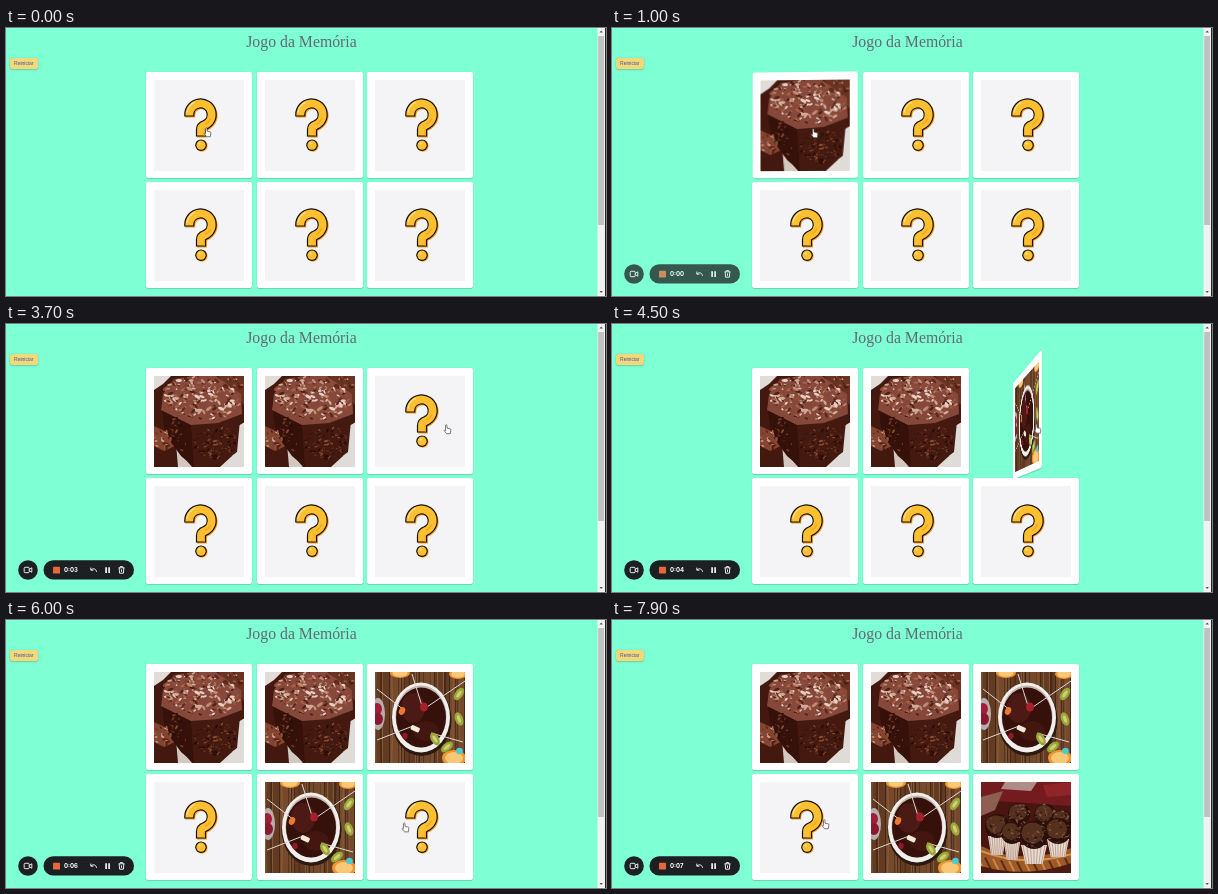
An HTML page for the animation above (8000 ms loop, 600x268 px).

```html
<!DOCTYPE html>
<html lang="pt">
<head>
<meta charset="utf-8">
<title>Jogo da Memória</title>
<style>
html, body { margin: 0; width: 600px; height: 268px; overflow: hidden; background: #7fffd4; }
body { position: relative; }
h1, .restart, .board, .card, .face, .bar, .rec, .cursor { position: absolute; }
h1 {
  margin: 0; left: 0; top: 3.6px; width: 591px; text-align: center;
  font: 15.8px/19px "Liberation Serif", "Times New Roman", serif; color: #5f6a72;
}
.restart {
  left: 4px; top: 30px; width: 27.5px; height: 11px; border-radius: 2px; text-align: center;
  font: 5px/11.5px "Liberation Sans", Arial, sans-serif; color: #4c4fa8;
  background: #f0d979; box-shadow: 0 .5px 1.5px rgba(60, 90, 70, .5);
}
.board { inset: 0; perspective: 520px; perspective-origin: 304px 207px; }
.card { width: 106px; height: 106px; transform-style: preserve-3d; }
.face {
  inset: 0; background: #fff; border-radius: 2px; backface-visibility: hidden;
  box-shadow: 0 .6px 1px rgba(0, 0, 0, .32);
}
.front { transform: rotateY(180deg); }
.face svg { position: absolute; left: 7.75px; top: 8px; width: 90.5px; height: 90.5px; overflow: hidden; }
.bar { left: 0; top: 0; }
.rec { left: 0; top: 226px; }
.rec text { font: 700 6px Inter, sans-serif; fill: #fff; }
.cursor { left: 0; top: 0; width: 10px; height: 13px; }
.cursor svg { position: absolute; left: 0; top: 0; overflow: visible; }
</style>
</head>
<body>
<h1>Jogo da Memória</h1>
<div class="restart">Reiniciar</div>
<div class="board"></div>

<svg class="bar" width="600" height="268">
  <path d="M591.5 0h7.5v268h-7.5z" fill="#f1f1f1"/>
  <path d="M592.2 8h5.8v189h-5.8z" fill="#c1c1c1"/>
  <path d="M593.5 4.5l1.7-2 1.7 2zM593.5 263l1.7 2 1.7-2z" fill="#555"/>
  <path d="M599 0h1v268h-1z" fill="#222"/>
</svg>

<svg class="rec" width="140" height="40">
  <g fill="#1d2022">
    <circle cx="22" cy="20" r="9.8"/>
    <rect x="37.5" y="10.2" width="90.5" height="19.4" rx="9.7"/>
  </g>
  <rect x="47" y="16.7" width="7" height="6.8" rx=".6" fill="#e5673a"/>
  <text x="58" y="22.2">0:00</text>
  <g fill="none" stroke="#fff" stroke-width=".9" stroke-linejoin="round">
    <rect x="18.2" y="17.3" width="5" height="5.4" rx="1"/>
    <path d="M23.2 19.4l2.6-1.6v4.4l-2.6-1.6"/>
    <path d="M84.8 17.6v2.6h2.6M85 20c1.8-2 4.8-1.6 5.6 1.8"/>
    <path d="M112.5 17.8h6M114.3 17.6v-1h2.4v1M113.2 18l.4 5.2h3.8l.4-5.2M115.5 19.4v2.4"/>
  </g>
  <path d="M99.3 17.3h1.6v5.6h-1.6zM102.3 17.3h1.6v5.6h-1.6z" fill="#fff"/>
</svg>

<div class="cursor">
  <svg class="hand" width="8" height="11">
    <path d="M1.5 5.6V1.2q.8-1 1.5 0v2.9l3.1.7q.9.3.8 1.3l-.6 3.6H2.6L.2 6.6q.2-1.2 1.3-.1z" fill="#fff" stroke="#444" stroke-width=".7" stroke-linejoin="round"/>
  </svg>
  <svg class="arrow" width="8" height="11">
    <path d="M0 0v7.2l1.6-1.5 1.1 2.5 1.1-.5-1.1-2.4h2.2z" fill="#fff" stroke="#222" stroke-width=".7"/>
  </svg>
</div>

<script>
const LOOP = 8000, FLIP = 500;
const $ = s => document.querySelector(s);

function random(seed) {
  return () => (seed = (seed * 16807) % 2147483647) / 2147483647;
}
const poly = (points, fill) => `<polygon points="${points}" fill="${fill}"/>`;
const oval = (x, y, rx, ry, fill, extra = '') =>
  `<ellipse cx="${x}" cy="${y}" rx="${rx}" ry="${ry}" fill="${fill}" ${extra}/>`;
const line = (d, stroke, width) =>
  `<path d="${d}" fill="none" stroke="${stroke}" stroke-width="${width}"/>`;
const picture = body => `<svg viewBox="0 0 90.5 90.5">${body}</svg>`;

// Flakes scattered inside a tilted ellipse
function flakes(rnd, n, [x, y, rx, ry, tilt], colors, size) {
  let out = '';
  for (let i = 0; i < n; i++) {
    const a = rnd() * 6.283, r = Math.sqrt(rnd());
    const px = r * rx * Math.cos(a), py = r * ry * Math.sin(a);
    const w = size * (.5 + rnd());
    out += oval(px, py, w, w * .45, colors[Math.floor(rnd() * colors.length)],
      `transform="rotate(${(rnd() * 120 - 60).toFixed()} ${px} ${py})"`);
  }
  return `<g transform="translate(${x} ${y}) rotate(${tilt})">${out}</g>`;
}

function question() {
  const hook = (a, b) => `M35.3 ${a}V34.6A11.2 11.2 0 1 1 50.8 45Q47 46.4 47 49.5V${b}`;
  return picture(`
    <rect width="91" height="91" fill="#f4f3f5"/>
    <g transform="translate(.9 .8)">${line(hook(36.6, 56.6), '#f59a23', 10)}${oval(47, 65.2, 5.7, 5.7, '#f59a23')}</g>
    ${line(hook(36.6, 56.6), '#15120f', 10.2)}
    ${line(hook(35.5, 55.5), '#fcbf2f', 7.8)}
    ${line('M50.3 49.6V55.4M56.9 38.5Q54.8 42.8 51 44.6', '#f5a623', 1.4)}
    ${line('M33 32.5Q34.5 25 40.5 22.2', '#ffe39a', 1.1)}
    ${oval(47, 65.2, 5.8, 5.8, '#15120f')}${oval(47, 65.2, 4.6, 4.6, '#fcbf2f')}
    ${oval(45.6, 63.6, 1.2, 1, '#ffe39a')}`);
}

function brownie() {
  const rnd = random(77);
  const crust = ['#c08a74', '#a7614a', '#e6d0c6', '#4e1f14', '#8f4e39', '#5f2a1c', '#d3aa98'];
  const crumb = ['#260c07', '#753c28', '#5c2819', '#31110a', '#8a5038'];
  return picture(`
    <rect width="91" height="91" fill="#43190f"/>
    ${poly('0,0 17,0 9,8 0,14', '#e2dcd8')}
    ${poly('91,46 91,91 66,91 78,80 84,50', '#dfdbd6')}
    ${poly('22,72 38,91 20,91', '#d3c8c0')}
    ${poly('64,0 91,0 91,30', '#6a3324')}
    ${poly('0,46 14,53 22,68 24,91 0,91', '#43180f')}
    ${poly('0,50 13,56 21,70 10,75 0,70', '#834430')}
    ${poly('7,27 37,46 40,91 27,80 11,58', '#35110a')}
    ${poly('37,46 87,34 83,76 68,87 40,91', '#441a10')}
    ${poly('20,3 58,-3 87,18 88,38 64,47 37,49 7,34 9,18', '#86483a')}
    ${flakes(rnd, 190, [48, 22, 38, 21, 9], crust, 2.3)}
    ${flakes(rnd, 90, [61, 66, 21, 17, -12], crumb, 1.6)}
    ${flakes(rnd, 24, [23, 58, 7, 19, -18], crumb, 1.6)}
    ${flakes(rnd, 26, [9, 64, 9, 9, 30], crust, 1.8)}
    ${flakes(rnd, 20, [80, 9, 9, 8, 30], crust, 1.8)}`);
}

function fondue() {
  const rnd = random(31);
  let planks = '';
  for (let x = 0; x < 91; x += 15) {
    planks += `<rect x="${x}" width="14.2" height="91" fill="${x % 2 ? '#74492c' : '#623b22'}"/>`;
    for (let k = 0; k < 4; k++) {
      const gx = x + 1 + rnd() * 12;
      planks += line(`M${gx} 0q${rnd() * 4 - 2} 45 0 91`, k % 2 ? '#3f2413' : '#946541', .8);
    }
  }
  const slice = (x, y, rx, ry) => oval(x, y, rx, ry, '#ef9531') + oval(x, y, rx * .75, ry * .75, '#f8c877');
  const kiwi = (x, y, a) => oval(x, y, 4, 7, '#98a83a', `transform="rotate(${a} ${x} ${y})"`) +
    oval(x, y, 1.6, 4, '#d2cf72', `transform="rotate(${a} ${x} ${y})"`);
  const sticks = ['M2 17L29 38', 'M2 68L38 54', 'M90 9L49 37', 'M37 2L47 34', 'M88 70L56 61'];
  return picture(`
    <rect width="91" height="91" fill="#3a2415"/>${planks}
    ${slice(25, 1, 10, 5)}${slice(83, 2, 9, 5)}${slice(79, 86, 12, 8)}
    ${oval(3, 42, 7, 16, '#b9adab')}${oval(2, 37, 5, 6, '#a31d36')}${oval(3, 47, 5, 6, '#8a1930')}
    ${kiwi(84, 47, -20)}${kiwi(84, 22, 35)}${kiwi(72, 75, 50)}
    ${oval(46.5, 48, 30, 36, '#2b1a10')}${oval(46, 45.5, 29, 35, '#f1eeec')}
    ${oval(46, 44.5, 25.5, 31, '#c4b5ad')}${oval(46, 45.5, 25, 30, '#36100b')}
    ${oval(38, 36, 12, 15, '#4b1a14')}${oval(51, 59, 13, 10, '#43160f')}
    ${sticks.map(d => line(d, '#ded8d2', 1)).join('')}
    ${oval(27, 39, 3, 4, '#e87a32', 'transform="rotate(25 27 39)"')}
    ${oval(49, 35, 4, 4.5, '#a61f2c')}${oval(30, 64, 2.7, 3.2, '#8f1927')}
    <rect x="36" y="54" width="9" height="5" rx="1.5" fill="#f4e9d8" transform="rotate(25 40 56)"/>
    ${kiwi(60, 67, -30)}
    ${oval(84.5, 79, 3.3, 3.3, '#49cdd0')}`);
}

function truffles() {
  const rnd = random(19);
  const nuts = ['#2c130c', '#6e4735', '#54301f', '#82583f'];
  const ball = (x, y, r) => oval(x, y, r, r, '#29100a') +
    oval(x - r * .1, y - r * .15, r * .8, r * .75, '#55301f') +
    flakes(rnd, 34, [x, y, r * .95, r * .95, 0], nuts, 1.3);
  const cup = (x, y, w, h) => {
    let out = poly(`${x - w},${y} ${x + w},${y} ${x + w * .65},${y + h} ${x - w * .65},${y + h}`, '#eadbd0');
    for (let k = -3; k <= 3; k++)
      out += line(`M${x + k * w / 3.5} ${y}L${x + k * w / 5.4} ${y + h}`, '#b09484', .8);
    return out;
  };
  let weave = '';
  for (let k = 0; k < 13; k++)
    weave += line(`M${k * 8 - 4} ${74 + 6 * Math.sin(k / 4)}l7 14`, k % 2 ? '#5e2b12' : '#cf8647', 2);
  return picture(`
    <rect width="91" height="91" fill="#4a1411"/>
    ${poly('0,0 91,0 91,24 0,18', '#741b20')}
    ${poly('24,0 56,0 50,9 20,7', '#b08c87')}${poly('62,3 91,0 91,13 66,15', '#8f2528')}
    ${poly('0,15 22,9 14,28 0,34', '#8c5f50')}
    <path d="M0 64Q40 84 91 66V91H0Z" fill="#9b5a28"/>${weave}
    ${line('M0 69Q42 86 91 72', '#d39450', 2)}
    <path d="M0 84Q45 97 91 81V91H0Z" fill="#4b1a12"/>
    ${ball(38, 32, 11)}${ball(64, 33, 11)}${ball(81, 38, 10)}
    ${cup(16, 54, 9, 19)}${ball(16, 44, 12)}
    ${cup(77, 57, 11, 18)}${ball(77, 49, 13)}
    ${cup(31, 60, 8, 18)}${ball(31, 51, 11)}
    ${cup(53, 63, 13, 19)}${ball(53, 53, 14)}`);
}

// Picture and flip start of each card, row by row
const cards = [
  [brownie, 570], [brownie, 2800], [fondue, 4350],
  [truffles], [fondue, 5170], [truffles, 6800]
];
const loop = (el, frames) => el.animate(
  frames.map(([t, style]) => ({ offset: t / LOOP, ...style })),
  { duration: LOOP, iterations: Infinity });
const turn = deg => ({ transform: `rotateY(${deg}deg)` });

cards.forEach(([photo, start], i) => {
  const card = document.createElement('div');
  card.className = 'card';
  card.style.left = 140 + (i % 3) * 110.5 + 'px';
  card.style.top = 44 + Math.floor(i / 3) * 110.4 + 'px';
  card.innerHTML = `<div class="face">${question()}</div><div class="face front">${photo()}</div>`;
  $('.board').append(card);
  if (start) loop(card, [
    [0, turn(0)], [start, { ...turn(0), easing: 'ease' }],
    [start + FLIP, turn(180)], [LOOP, turn(180)]
  ]);
});

// Time, x, y of the pointer
const path = [
  [0, 198, 99], [1000, 199, 100], [1900, 199, 100], [2400, 305, 88], [2900, 305, 89],
  [3500, 448, 100], [3700, 438, 100], [4350, 424, 98], [4650, 420, 101], [5100, 320, 199],
  [5650, 320, 199], [6250, 438, 204], [6800, 412, 204], [7000, 375, 203],
  [7400, 214, 200], [7900, 210, 199], [8000, 210, 199]
];
loop($('.cursor'), path.map(([t, x, y]) =>
  [t, { transform: `translate(${x}px, ${y}px)`, easing: 'ease-in-out' }]));

const clock = loop($('.rec'), [
  [0, { opacity: 0 }], [700, { opacity: 0 }], [1100, { opacity: 1 }], [LOOP, { opacity: 1 }]
]);
const label = $('.rec text');

function tick() {
  const t = (clock.currentTime || 0) % LOOP;
  label.textContent = '0:0' + (t < 1100 ? 0 : Math.floor((t + 40) / 1000));
  const between = t > 6920 && t < 7250;
  $('.hand').style.display = between ? 'none' : '';
  $('.arrow').style.display = between ? '' : 'none';
  requestAnimationFrame(tick);
}
tick();
</script>
</body>
</html>
```
